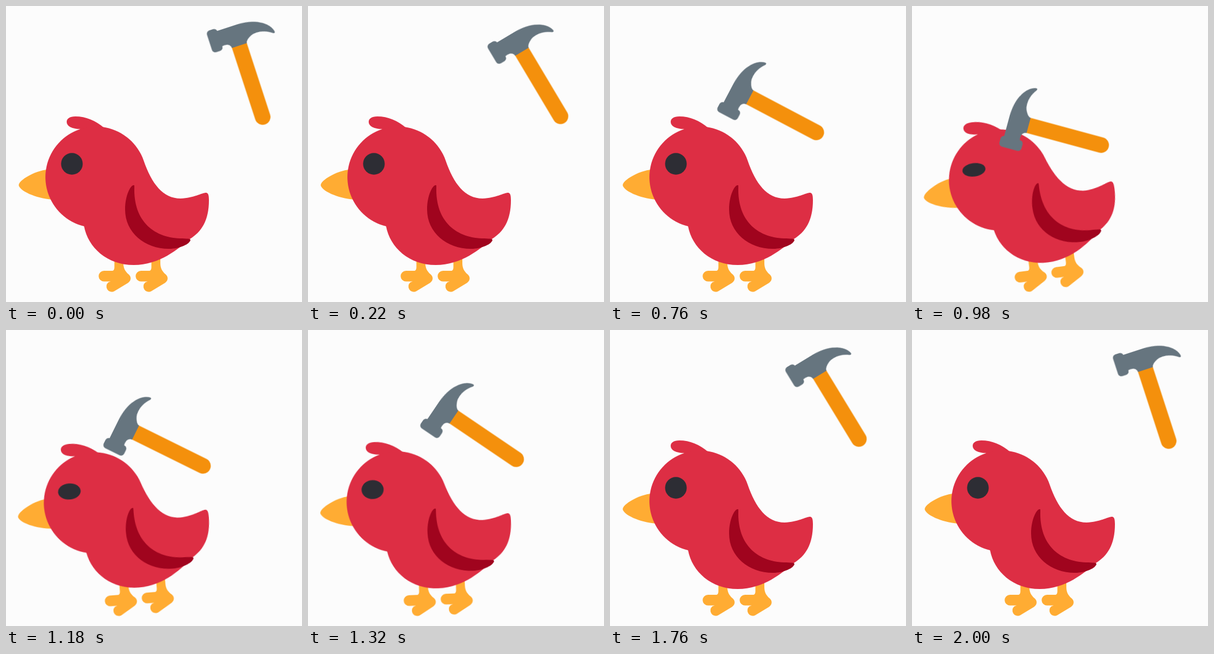
An HTML page that plays this animation: 512x512 px, repeating every 2080 ms.

```html
<!DOCTYPE html>
<html lang="en">
<head>
<meta charset="utf-8">
<title>Bird and hammer</title>
<style>
  html, body { margin: 0; width: 100%; height: 100%; overflow: hidden; background: #fcfcfc; }
  svg { display: block; width: 100%; height: 100%; }

  .slide, .drop, .swing, .bird, .eye { animation: 2.08s linear infinite; }
  .slide { animation-name: slide; }
  .drop { animation-name: drop; }
  .swing { animation-name: swing; }
  .bird { animation-name: tilt; transform-origin: 192px 332px; }
  .eye { animation-name: squint; transform-origin: 114px 273px; }

  /* Strike lands at 980 ms; the hammer is back at 2000 ms. */
  @keyframes slide {
    0% { transform: translateX(417.7px); animation-timing-function: cubic-bezier(.4, .15, .75, .87); }
    47.115% { transform: translateX(245.1px); animation-timing-function: cubic-bezier(.35, .075, .65, .86); }
    96.154%, 100% { transform: translateX(417.7px); }
  }
  @keyframes drop {
    0% { transform: translateY(111.2px); animation-timing-function: cubic-bezier(.4, .01, .75, .56); }
    47.115% { transform: translateY(218.4px); animation-timing-function: cubic-bezier(.4, .28, .55, 1.08); }
    96.154%, 100% { transform: translateY(111.2px); }
  }
  @keyframes swing {
    0%, 96.154%, 100% { transform: rotate(-18deg); }
    47.115% { transform: rotate(-74.9deg); }
  }
  @keyframes tilt {
    0%, 40% { transform: rotate(0deg); }
    47.115% { transform: rotate(-7.3deg); animation-timing-function: cubic-bezier(.3, .2, .7, .8); }
    71.6%, 100% { transform: rotate(0deg); }
  }
  @keyframes squint {
    0%, 40% { transform: scale(1, 1); }
    47.115% { transform: scale(1.07, .62); animation-timing-function: cubic-bezier(.35, .1, .7, .85); }
    71.6%, 100% { transform: scale(1, 1); }
  }
</style>
</head>
<body>
<svg viewBox="0 0 512 512">
  <defs>
    <path id="foot" d="M169.500 458H184.500Q187.500 457 187.500 452V436H203V445C203 454 207 460 212 464C217 468 217 475 211 479L187 493.500A9.300 9.300 0 0 1 177 478L181 476.500H169.500A9.250 9.250 0 0 1 169.500 458Z"/>
  </defs>

  <g class="bird">
    <g fill="#ffac33">
      <use href="#foot"/>
      <use href="#foot" x="64"/>
      <path d="M72 283C50 285 22 301 22 310C24 320 50 332 80 335Z"/>
    </g>
    <g fill="#dd2e44">
      <path d="M170 211C155 198 138 191 120 191C110 191 105 195 105 200C105 210 118 213 132 213Z"/>
      <path d="M135 381A87.400 87.400 0 1 1 238 267C252 308 272 333 302 333C325 332 339 323 346 323C350 323 351 328 351 336C351 371 338 391 318 403C298 420 266 448 221 448C175 448 142 418 135 381Z"/>
    </g>
    <path fill="#a0041e" d="M221 310C216 309 206 327 206 352C206 392 240 420 282 420C302 420 318 411 319 405C319 402 316 403 305 402C258 402 220 374 222 313C222 310 222 310 221 310Z"/>
    <circle class="eye" cx="114" cy="273" r="18.700" fill="#2d2d34"/>
  </g>

  <g class="slide"><g class="drop"><g class="swing">
    <g transform="translate(0 85)">
      <path fill="#f4900c" d="M-13.500 -132H13.500V0A13.500 13.500 0 0 1 -13.500 0Z"/>
      <g fill="#66757f">
        <rect x="-47.500" y="-171" width="19" height="39.500" rx="6"/>
        <path d="M-13.500 -130C-14 -137 -20 -140 -30 -138V-166H8C38 -166 62 -152 65.500 -135Q66 -130.500 62 -132.500C48 -143 33 -144 24 -140C17 -137 14 -133 13.500 -130Z"/>
      </g>
    </g>
  </g></g></g>
</svg>
</body>
</html>
```
